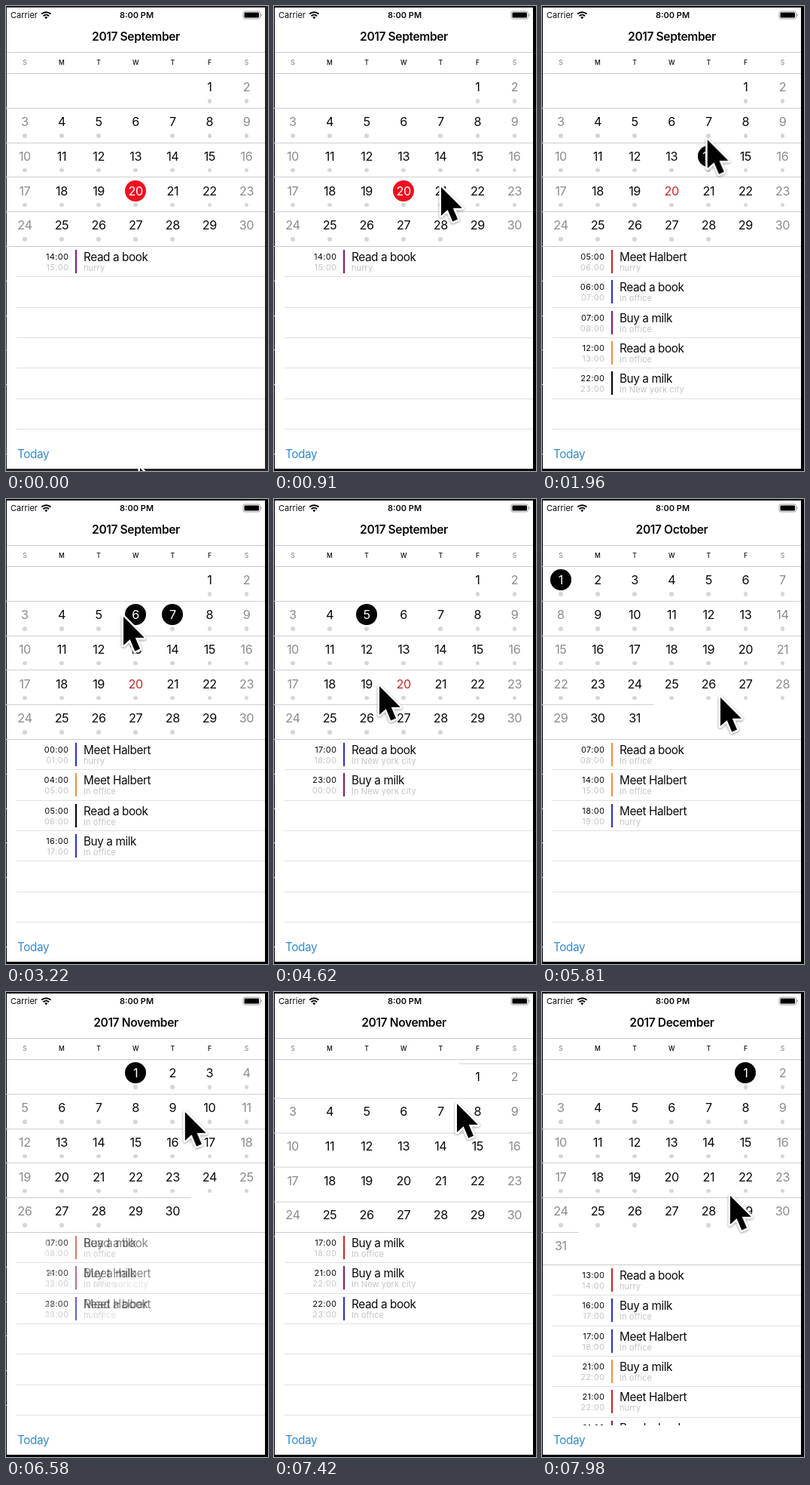
Recreate the animation shown at these times as an HTML page. Size 348 by 616 pixels, loop 8 s.

```html
<!DOCTYPE html>
<html lang="en">
<head>
<meta charset="utf-8">
<title>Calendar</title>
<style>
  html, body { margin: 0; width: 100%; height: 100%; overflow: hidden; }
  #stage {
    position: relative; width: 348px; height: 616px; overflow: hidden;
    font: 15.3px Inter, "Liberation Sans", sans-serif; letter-spacing: -.4px; color: #0a0a0a;
    animation: frame 8s step-end infinite;
  }
  #stage div, #stage span, #stage svg { position: absolute; white-space: nowrap; }
  #screen { left: 1px; top: 2px; width: 343px; height: 611px; background: #fff; }
  .line { left: 1px; width: 343px; height: 1px; background: #c9c9c9; }

  .status { top: 2px; line-height: 20px; font-size: 11px; letter-spacing: 0; }
  .title { left: 0; width: 345px; top: 31px; line-height: 20px; text-align: center; font-size: 15.6px; font-weight: 600; }
  .week { width: 49px; top: 65px; line-height: 20px; text-align: center; font-size: 8.5px; font-weight: 500; letter-spacing: 0; }
  .off { color: #8c8c8c; }

  #body { left: 0; top: 89px; width: 344px; height: 524px; overflow: hidden; }
  #strip { left: .4px; top: 0; }
  #stage .month { display: grid; grid-template-columns: repeat(7, 49.1px); grid-auto-rows: 45.8px; }
  #stage .day { position: relative; border-top: 1px solid #cfcfcf; }
  .num { left: 10.5px; top: 3.2px; width: 28px; line-height: 28px; text-align: center; font-size: 16.2px; border-radius: 50%; }
  .pick { background: #000; color: #fff; }
  .now { color: #bf2a30; }
  .pick.now { background: #ef101f; color: #fff; }
  .dot { left: 21.7px; top: 33.3px; width: 5.6px; height: 5.6px; border-radius: 50%; background: #d6d6d6; }

  #panel { left: 1px; top: 229px; width: 343px; height: 300px; background: #fff; animation: drop 8s infinite; }
  .rule { left: 13px; width: 330px; height: 1px; background: #e0e0e0; }
  .time { left: 32px; width: 50.4px; line-height: 16px; text-align: right; font-size: 11px; letter-spacing: .35px; }
  .dim { color: #c4c4c4; }
  .bar { left: 91px; width: 2px; height: 31px; }
  .name { left: 102px; line-height: 20px; }
  .place { left: 102px; line-height: 16px; font-size: 11px; letter-spacing: .1px; color: #c4c4c4; }

  #foot { left: 1px; top: 574px; width: 343px; height: 39px; background: #fff; }
  #foot span { left: 14px; top: 10px; line-height: 20px; color: #3489cb; }
  #cursor { left: -6px; top: -6px; overflow: visible; filter: drop-shadow(0 1.5px 1.5px #0006); }

  @keyframes frame { 0% { background: #262324; } 11.375%, 100% { background: #000; } }
  @keyframes drop {
    0%, 96.25% { transform: none; animation-timing-function: ease-out; }
    100% { transform: translateY(43.3px); }
  }
</style>
</head>
<body>
<div id="stage">
  <div id="screen"></div>
  <div id="body">
    <div id="strip"></div>
    <div id="panel"><div class="line" style="left:0;top:0"></div></div>
  </div>
  <div id="foot"><span>Today</span></div>
  <span class="status" style="left:6px">Carrier</span>
  <svg style="left:46px;top:6px" width="15" height="12" fill="none" stroke="#000" stroke-width="2">
    <path d="M1.2 4.6a9 9 0 0 1 12.2 0M3.6 7.2a5.4 5.4 0 0 1 7.4 0"/>
    <path d="M7.3 11.2l-2-2.2a3 3 0 0 1 4 0z" fill="#000" stroke="none"/>
  </svg>
  <span class="status" style="left:151px;font-weight:600">8:00 PM</span>
  <svg style="left:314px;top:6px" width="27" height="12">
    <rect x="1" y="1" width="22.5" height="10" rx="2.5" fill="none" stroke="#a0a0a0"/>
    <rect x="2.5" y="2.5" width="19.5" height="7" rx="1.3"/>
    <path d="M24.7 4a2.2 2.2 0 0 1 0 4z" fill="#a0a0a0"/>
  </svg>
  <div class="line" style="top:61px"></div>
  <div class="line" style="top:89px"></div>
  <svg id="cursor" width="40" height="56">
    <path transform="translate(6 6) scale(1.05 1.02)" d="M0 0V37L8.3 29.5 14.5 44.5 21 41.7 15 27.3H26.5Z"
      stroke="#fff" stroke-width="5" stroke-linejoin="round" paint-order="stroke"/>
  </svg>
</div>
<script>
const LOOP = 8000, ROW = 40.35, PAGE = 229, FADE = 140;
const LAG = 70, DRAG = 270, GLIDE = 550, LIFT = 120;
const $ = id => document.getElementById(id);
const stage = $('stage'), panel = $('panel');

// Events read: hour, bar colour, title, place
const colors = { p: '#7d1a72', r: '#c5242f', b: '#2a2fb8', o: '#e8913f', k: '#000' };
const names = { R: 'Read a book', B: 'Buy a milk', M: 'Meet Halbert' };
const places = { h: 'hurry', o: 'In office', n: 'In New york city' };

const taps = [
  { day: 20, at: 0, x: 178, y: 612, events: '14pRh' },
  { day: 21, at: 1050, x: 222, y: 240, events: '01bBo 03oRh 08rMn 11pBo 16kRo 20bMh' },
  { day: 14, at: 1750, x: 219, y: 193, events: '05rMh 06bRo 07pBo 12oRo 22kBn' },
  { day: 7, at: 2520, x: 221, y: 150, events: '00bMh 04oMo 05kRo 16bBo' },
  { day: 6, at: 3220, x: 156, y: 156, events: '' },
  { day: 5, at: 4060, x: 112, y: 152, events: '17bRn 23pBn' },
];
const swipes = [
  { at: 4830, x: 140, y: 248, events: '07oRo 14oMo 18bMh' },
  { at: 5950, x: 237, y: 263, events: '17rBo 21pBn 22bRo' },
  { at: 7000, x: 243, y: 268, events: '13rRh 16bBo 17bMo 21oBo 21rMh 21pRo' },
];
const landings = swipes.map(s => ({ day: 1, at: s.at + GLIDE + 10, events: s.events }));
const months = [
  { name: 'September', free: 6, today: 20, picks: taps },
  { name: 'October', picks: [landings[0]] },
  { name: 'November', picks: [landings[1]] },
  { name: 'December', free: 27, picks: [landings[2]] },
];

function add(parent, cls, text = '', style = {}) {
  const el = document.createElement('div');
  el.className = cls;
  el.textContent = text;
  Object.assign(el.style, style);
  parent.append(el);
  return el;
}

const play = (el, keys) => el.animate(keys, { duration: LOOP, iterations: Infinity });
const moment = (ms, props) => ({ offset: Math.min(ms / LOOP, 1), ...props });

// Visible between two times, with an optional fade at both ends.
function show(el, from, to = LOOP, fade = 0) {
  const keys = [];
  const key = (ms, opacity) => keys.push(moment(ms, { opacity }));
  if (from) { key(0, 0); key(from, 0); }
  key(from && from + fade, 1);
  if (to < LOOP) { key(to, 1); key(to + fade, 0); }
  key(LOOP, to < LOOP ? 0 : 1);
  play(el, keys);
}

[...'SMTWTFS'].forEach((d, i) =>
  add(stage, 'week' + (i % 6 ? '' : ' off'), d, { left: .4 + i * 49.1 + 'px' }));

months.forEach(({ name, free, today, picks }, i) => {
  const at = picks[0].at;
  const first = new Date(2017, 8 + i, 1).getDay();
  const days = new Date(2017, 9 + i, 0).getDate();
  show(add(stage, 'title', '2017 ' + name), at, months[i + 1]?.picks[0].at);
  const page = add($('strip'), 'month', '', { top: i * PAGE + 'px' });
  for (let d = 1; d <= days; d++) {
    const col = (first + d - 1) % 7;
    const now = d === today ? ' now' : '';
    const cell = add(page, 'day', '', d === 1 ? { gridColumnStart: col + 1 } : {});
    add(cell, 'num' + (col % 6 ? '' : ' off') + now, d);
    if (d < 29 && d !== free) show(add(cell, 'dot'), at);
    const n = picks.findIndex(p => p.day === d);
    if (n >= 0) show(add(cell, 'num pick' + now, d), picks[n].at, picks[n + 1]?.at + LAG || LOOP);
  }
});

for (let i = 1; i < 8; i++) add(panel, 'rule', '', { top: Math.round(i * ROW) + 'px' });

const clock = h => String(h % 24).padStart(2, '0') + ':00';
[...taps, ...landings].forEach(({ at, events }, i, all) => {
  const list = add(panel, 'list');
  events.split(' ').filter(Boolean).forEach((e, row) => {
    const hour = +e.slice(0, 2);
    const put = (cls, y, text, style) => add(list, cls, text, { top: row * ROW + y + 'px', ...style });
    put('time', 6, clock(hour));
    put('time dim', 20, clock(hour + 1));
    put('bar', 5, '', { background: colors[e[2]] });
    put('name', 5, names[e[3]]);
    put('place', 21, places[e[4]]);
  });
  show(list, at, all[i + 1]?.at, FADE);
});

const glide = [];
swipes.forEach(({ at }, i) => {
  const shift = n => ({ transform: `translateY(${-n * PAGE}px)` });
  glide.push(moment(at, { ...shift(i), easing: 'cubic-bezier(.25, .3, .2, 1)' }), moment(at + GLIDE, shift(i + 1)));
});
play($('strip'), [{ ...glide[0], offset: 0, easing: 'linear' }, ...glide, { ...glide.at(-1), offset: 1 }]);

// The pointer spends 65% of each gap travelling, then rests until it acts.
const trail = [];
let free = 0;
const point = (ms, x, y) => trail.push(moment(ms, { transform: `translate(${x}px, ${y}px)`, easing: 'ease-in-out' }));
function go({ at, x, y }) {
  if (at) point(free + (at - free) * .65, x, y);
  point(at, x, y);
  free = at;
}
taps.forEach(go);
swipes.forEach(s => {
  go(s);
  free += GLIDE;
  point(s.at + DRAG, s.x, s.y - LIFT);
  point(free, s.x, s.y - LIFT);
});
go({ at: 8200, x: 250, y: 270 });
play($('cursor'), trail);
stage.append($('cursor'));
</script>
</body>
</html>
```
